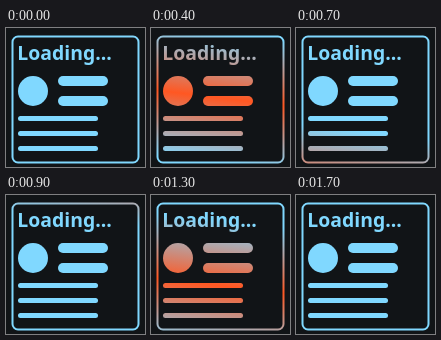
An HTML page for the animation above (1.8 s loop, 139 by 139 pixels).

```html
<!DOCTYPE html>
<html lang="en">
<head>
<meta charset="utf-8">
<title>Loading</title>
<style>
  html, body { margin: 0; width: 100%; height: 100%; overflow: hidden; background: #111417; }
  svg { display: block; width: 100vw; height: 100vh; }
  text { font: bold 19.4px "Noto Sans", "Open Sans", sans-serif; }
</style>
</head>
<body>
<svg viewBox="0 0 139 139">
  <defs>
    <linearGradient id="shimmer" gradientUnits="userSpaceOnUse" x1="77.7" y1="-64.1" x2="62.3" y2="64.1">
      <stop offset="0" stop-color="#80d8ff"/>
      <stop offset=".5" stop-color="#ff5722"/>
      <stop offset="1" stop-color="#80d8ff"/>
    </linearGradient>
  </defs>
  <rect x="6.5" y="8.5" width="126" height="126" rx="5.5" fill="none" stroke="url(#shimmer)" stroke-width="2"/>
  <g fill="url(#shimmer)">
    <text x="11.3" y="32">Loading...</text>
    <circle cx="27" cy="63" r="15"/>
    <rect x="52" y="48" width="50" height="10" rx="5"/>
    <rect x="52" y="68" width="50" height="10" rx="5"/>
    <rect x="12" y="88" width="80" height="5" rx="2.5"/>
    <rect x="12" y="103" width="80" height="5" rx="2.5"/>
    <rect x="12" y="118" width="80" height="5" rx="2.5"/>
  </g>
</svg>
<script>
  const LOOP = 1800, STEP = 100, SECOND_SWEEP = 837;
  const START = -62, SPEED = 0.33; // px, px per ms
  const shimmer = document.getElementById("shimmer");

  function draw(now) {
    const t = Math.floor((now % LOOP) / STEP) * STEP;
    const elapsed = t < SECOND_SWEEP ? t : t - SECOND_SWEEP;
    shimmer.setAttribute("gradientTransform", `translate(0 ${START + SPEED * elapsed})`);
  }

  const begin = performance.now();
  function tick() {
    draw(performance.now() - begin);
    requestAnimationFrame(tick);
  }
  tick();
</script>
</body>
</html>
```
